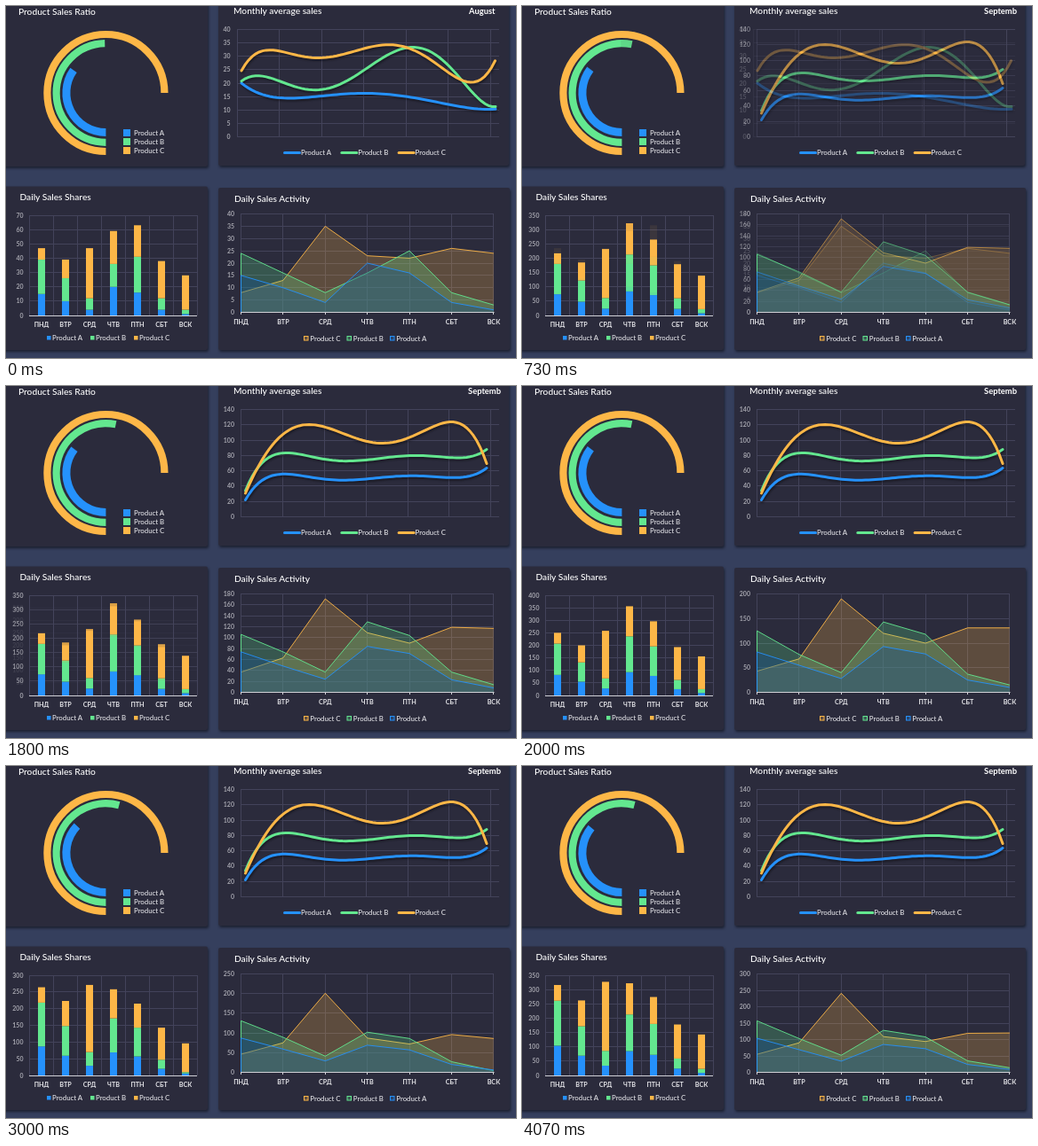
An HTML page that plays this animation: 574 px wide and 397 px high, repeating every 4140 ms.

```html
<!DOCTYPE html>
<html lang="en">
<head>
<meta charset="utf-8">
<title>Sales dashboard</title>
<style>
  html, body { margin: 0; width: 100%; height: 100%; overflow: hidden; background: #353f5d; }
  svg { display: block; width: 574px; height: 397px; font-family: Lato, "Open Sans", sans-serif; }
  .panel { fill: #2b2b3c; filter: drop-shadow(1px 2px 1.5px rgba(0, 0, 0, .5)); }
  .title { font-size: 10.2px; font-weight: 500; fill: #fff; }
  .month { font-size: 9.4px; font-weight: 700; fill: #fff; }
  .key { font-size: 7.8px; font-weight: 500; fill: #e4e4e8; }
  .cat { font-size: 7.2px; font-weight: 700; fill: #e4e4e8; text-anchor: middle; }
  .num { font-size: 7px; font-weight: 700; fill: #a3a3ac; text-anchor: end; }
  .grid { stroke: #43435a; stroke-width: 1; fill: none; }
  .axis { stroke: #d0d0d6; stroke-width: 1; fill: none; }
  .stack { isolation: isolate; }
  .stack > g { mix-blend-mode: plus-lighter; }
  .curves { filter: drop-shadow(1px 2px 1px rgba(0, 0, 0, .4)); }
  .curves path { fill: none; stroke-width: 3; stroke-linecap: round; }
</style>
</head>
<body>
<svg id="stage" viewBox="0 0 574 397"></svg>
<script>
const COLORS = ['#2591fb', '#63e78f', '#fdb747'];
const NAMES = ['Product A', 'Product B', 'Product C'];
const DAYS = ['ПНД', 'ВТР', 'СРД', 'ЧТВ', 'ПТН', 'СБТ', 'ВСК'];
const LOOP = 4140;

// One entry per state: axis ranges and the daily sales of products A, B and C.
const STATES = [
  { bar: [70, 10], area: [40, 5], sales: [
    [15, 10, 4, 20, 16, 4, 1], [24, 16, 8, 16, 25, 8, 3], [8, 13, 35, 23, 22, 26, 24]] },
  { bar: [350, 50], area: [180, 20], sales: [
    [74, 48, 24, 84, 71, 23, 8], [106, 74, 37, 129, 104, 37, 14], [37, 63, 171, 109, 90, 119, 117]] },
  { bar: [400, 50], area: [200, 50], sales: [
    [82, 55, 28, 93, 78, 25, 10], [125, 77, 40, 143, 118, 37, 15], [43, 68, 190, 120, 100, 131, 131]] },
  { bar: [300, 50], area: [250, 50], sales: [
    [87, 59, 29, 69, 57, 20, 6], [131, 89, 41, 102, 86, 27, 4], [46, 75, 201, 87, 72, 96, 86]] },
  { bar: [350, 50], area: [300, 50], sales: [
    [104, 69, 34, 85, 72, 24, 9], [157, 103, 52, 128, 108, 35, 14], [55, 90, 241, 109, 94, 119, 120]] }
];

// Curves are trend polynomials, given by their ends and turning points.
const MONTHS = [
  { name: 'August', x: 521, left: 260.3, edge: 252.5, axis: [40, 5], curves: [
    [[265, 87], [319, 104], [404, 98.5], [543, 116.5], [551, 116.4]],
    [[265, 85], [282, 78.5], [349, 94.5], [458, 46.5], [551, 113.5]],
    [[265, 73], [296, 50], [355, 58], [433, 43.5], [523, 86], [550.5, 62]]] },
  { name: 'Septemb', x: 520, left: 264.8, edge: 257, axis: [140, 20], curves: [
    [[269.5, 128.5], [312, 99.5], [389, 106], [457, 101], [503, 103.5], [541, 92.5]],
    [[269.5, 118], [315, 75.5], [386, 84.5], [463, 78.5], [509, 81], [541, 71.5]],
    [[269.5, 121], [341, 43.5], [424, 64.5], [501, 40.5], [541, 87.5]]] }
];

// Each transition: times of its steps, opacity of the new state for the quick and the slow charts.
const FADES = [
  { at: [600, 670, 730, 800, 870], quick: [.2, .6, .92, 1, 1], slow: [.08, .35, .68, .9, 1] },
  { at: [1800, 1870, 1930, 2000], quick: [.16, .55, .88, 1], slow: [0, .35, .75, 1] },
  { at: [2800, 2870, 2930, 3000], quick: [.16, .55, .88, 1], slow: [0, .35, .75, 1] },
  { at: [3870, 3930, 4000, 4070], quick: [.16, .55, .88, 1], slow: [0, .35, .75, 1] }
];

const text = (cls, x, y, s) => `<text class="${cls}" x="${x}" y="${y}">${s}</text>`;
const rect = (x, y, w, h, fill) => `<rect x="${x}" y="${y}" width="${w}" height="${h}" fill="${fill}"/>`;
const path = (d, attrs) => `<path d="${d}" ${attrs}/>`;
const panel = (x, y, w, h) => `<rect class="panel" x="${x}" y="${y}" width="${w}" height="${h}" rx="2"/>`;
const each = (n, fn) => Array.from({ length: n }, (_, i) => fn(i)).join('');
const snap = v => Math.round(v - .5) + .5;

function scale([max, step], left, right, top, bottom, edge) {
  return each(max / step + 1, i => {
    const y = bottom - (bottom - top) * i * step / max;
    return path(`M${left} ${snap(y)}H${right}`, 'class="grid"') + text('num', edge, y + 2.5, i * step);
  });
}

const columns = (left, pitch, n, top, bottom) =>
  path(each(n, i => `M${snap(left + pitch * i)} ${top}V${bottom}`), 'class="grid"');

function ring(state) {
  const sums = state.sales.map(row => row.reduce((a, b) => a + b));
  const radii = [44.5, 55.8, 66], cx = 112.4, cy = 98;
  return sums.map((sum, i) => {
    const turn = 1.5 * Math.PI * sum / sums[2], r = radii[i];
    const x = cx - r * Math.sin(turn), y = cy + r * Math.cos(turn);
    return path(`M${cx} ${cy + r}A${r} ${r} 0 ${+(turn > Math.PI)} 1 ${x} ${y}`,
      `fill="none" stroke="${COLORS[i]}" stroke-width="${i ? 8.2 : 9}"`);
  }).join('');
}

function bars(state) {
  const unit = 113 / state.bar[0];
  return scale(state.bar, 26, 215, 236, 349, 19.5) + columns(26.5, 27, 8, 236, 349) + each(7, day => {
    let y = 349;
    return state.sales.map((row, i) => {
      const h = row[day] * unit;
      y -= h;
      return rect(36 + 27 * day, y, 8, h, COLORS[i]);
    }).join('');
  });
}

function areas(state) {
  const base = 345.5, unit = 111 / state.area[0], pitch = 47.4;
  const shape = i => {
    const line = `M264.5 ${base}` +
      state.sales[i].map((v, k) => `L${264.5 + pitch * k} ${base - v * unit}`).join('');
    const fill = i ? `fill="${COLORS[i]}" fill-opacity=".24"` : 'fill="#0a4a96" fill-opacity=".32"';
    return path(`${line}V${base}Z`, fill) +
      path(line, `fill="none" stroke="${COLORS[i]}" stroke-opacity=".9"`);
  };
  return scale(state.area, 264, 549, 234.5, base, 257) + columns(264.5, pitch, 7, 235, base) +
    [2, 1, 0].map(shape).join('');
}

// Solves the symmetric system m * c = v by elimination.
function solve(m, v) {
  const n = v.length;
  for (let i = 0; i < n; i++)
    for (let r = i + 1; r < n; r++) {
      const f = m[r][i] / m[i][i];
      for (let k = i; k < n; k++) m[r][k] -= f * m[i][k];
      v[r] -= f * v[i];
    }
  const c = Array(n).fill(0);
  for (let i = n - 1; i >= 0; i--)
    c[i] = (v[i] - c.reduce((sum, ck, k) => sum + ck * m[i][k], 0)) / m[i][i];
  return c;
}

// Least-squares polynomial of degree 6 through the points, level at the inner ones.
function trend(points) {
  const first = points[0][0], last = points[points.length - 1][0];
  const norm = x => 2 * (x - first) / (last - first) - 1;
  const powers = [0, 1, 2, 3, 4, 5, 6], rows = [], goal = [];
  points.forEach(([x, y], i) => {
    const s = norm(x);
    rows.push(powers.map(p => s ** p));
    goal.push(y);
    if (i && i < points.length - 1) {
      rows.push(powers.map(p => p && .15 * p * s ** (p - 1)));
      goal.push(0);
    }
  });
  const dot = (p, col) => rows.reduce((sum, row, k) => sum + row[p] * col(k), 0);
  const coef = solve(powers.map(p => powers.map(q => dot(p, k => rows[k][q]))), powers.map(p => dot(p, k => goal[k])));
  return 'M' + Array.from({ length: 73 }, (_, i) => {
    const x = first + (last - first) * i / 72;
    return `${x.toFixed(2)} ${coef.reduce((sum, c, p) => sum + c * norm(x) ** p, 0).toFixed(2)}`;
  }).join('L');
}

function lines({ left, axis, edge, curves }) {
  const right = 555;
  return scale(axis, left, right, 26.5, 147.5, edge) + columns(left, (right - left) * 5 / 31, 7, 26, 148) +
    `<g class="curves">${curves.map((c, i) => path(trend(c), `stroke="${COLORS[i]}"`)).join('')}</g>`;
}

const layers = (id, list, draw) =>
  `<g class="stack" id="${id}">${list.map(s => `<g>${draw(s)}</g>`).join('')}</g>`;

function keys() {
  return each(3, i => {
    const y = 139 + 10 * i, color = COLORS[i], name = NAMES[i];
    const lx = 312 + 64.3 * i, bx = 46 + 49 * i, ax = 432.5 - 48.5 * i;
    return rect(132, y, 8, 8, color) + text('key', 144, y + 7, name) +
      path(`M${lx + 1.5} 165.5h17`, `stroke="${color}" stroke-width="3" stroke-linecap="round"`) +
      text('key', lx + 20, 168.2, name) +
      rect(bx, 372, 4.5, 4.5, color) + text('key', bx + 6, 377, name) +
      `<rect x="${ax}" y="372.5" width="4.5" height="4.5" fill="${color}" fill-opacity=".25" stroke="${color}"/>` +
      text('key', ax + 6.8, 377.5, name);
  });
}

document.getElementById('stage').innerHTML =
  panel(-4, -6, 231, 187) + panel(239, -6, 327, 186) + panel(-4, 203.5, 231, 184.5) + panel(239, 205, 328, 183) +
  text('title', 14, 10, 'Product Sales Ratio') + text('title', 256, 9.3, 'Monthly average sales') +
  text('title', 15.5, 219, 'Daily Sales Shares') + text('title', 257, 220.6, 'Daily Sales Activity') +
  layers('ring', STATES, ring) + layers('bars', STATES, bars) +
  layers('lines', MONTHS, lines) + layers('areas', STATES, areas) +
  layers('month', MONTHS, m => text('month', m.x, 9.3, m.name)) +
  path('M26 349.5H215', 'class="axis"') +
  path('M264 345.5H549.5' + each(7, i => `M${snap(264.5 + 47.4 * i)} 345v3`), 'class="axis"') +
  DAYS.map((d, i) => text('cat', 40 + 27 * i, 362, d) + text('cat', 264.5 + 47.4 * i, 359.3, d)).join('') +
  keys();

// Position among the states: whole part is the old state, fraction the new one's opacity.
const position = (t, speed) => FADES.reduce((sum, f) => {
  const step = f.at.filter(at => at <= t).length;
  return sum + (step ? f[speed][step - 1] : 0);
}, 0);

function show(id, pos) {
  const group = [...document.getElementById(id).children];
  group.forEach((g, i) => {
    const a = Math.max(0, 1 - Math.abs(Math.min(pos, group.length - 1) - i));
    g.style.opacity = a;
    g.style.display = a ? '' : 'none';
  });
}

function render(t) {
  const quick = position(t, 'quick'), slow = position(t, 'slow');
  show('ring', quick);
  show('bars', quick);
  show('lines', slow);
  show('areas', slow);
  show('month', t < 670 ? 0 : 1);
}

const start = performance.now();
function tick() {
  render((performance.now() - start) % LOOP);
  requestAnimationFrame(tick);
}
tick();
</script>
</body>
</html>
```
